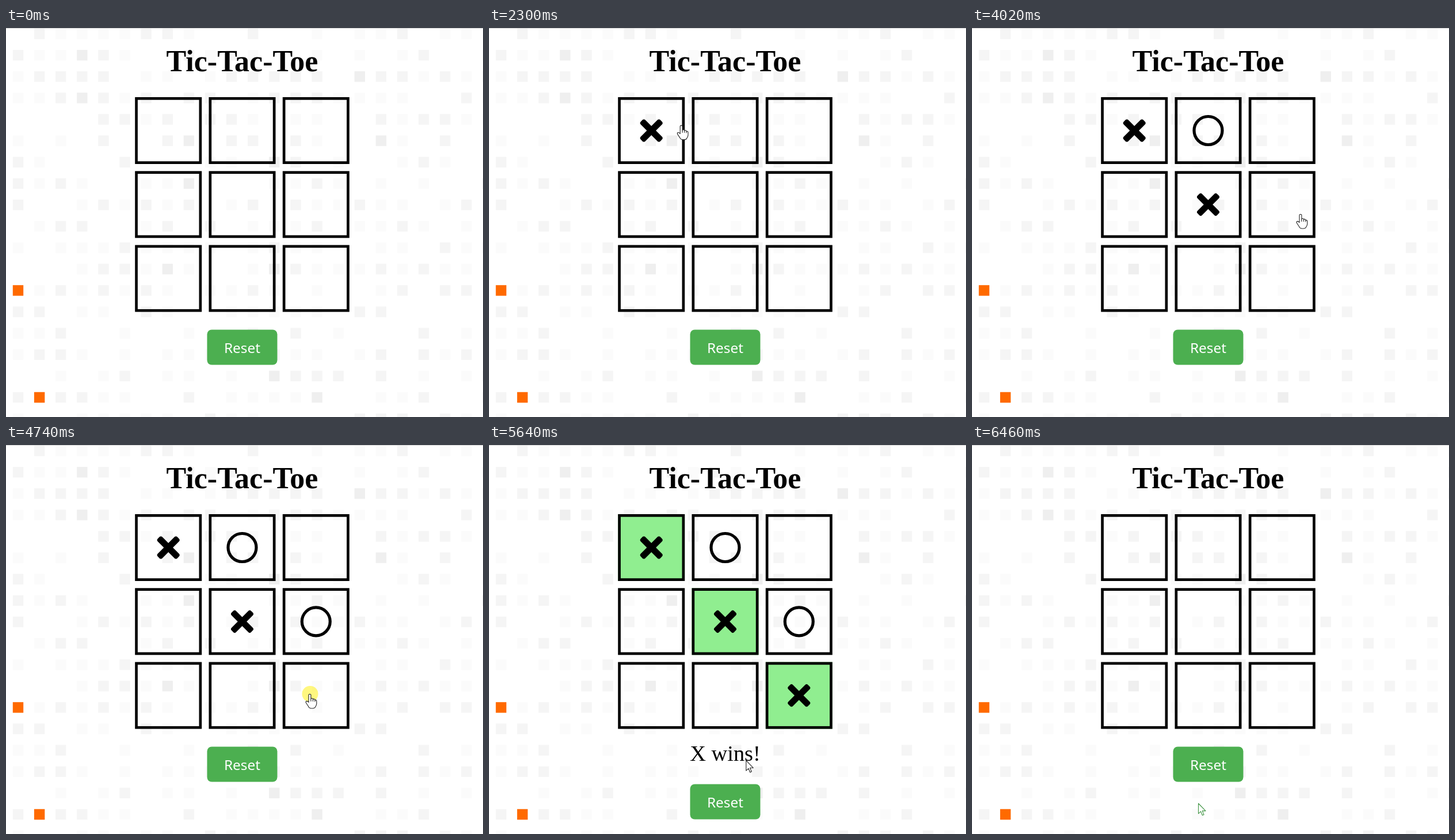
Recreate the animation shown at these times as an HTML page with a canvas. Size 829 px wide and 675 px high, loop 6660 ms.

```html
<!DOCTYPE html>
<html lang="en">
<head>
<meta charset="utf-8">
<title>Tic-Tac-Toe</title>
<style>
html, body { margin: 0; width: 100%; height: 100%; overflow: hidden; background: #fff; }
canvas { display: block; }
</style>
</head>
<body>
<canvas id="stage" width="829" height="675"></canvas>
<script>
const ctx = document.getElementById('stage').getContext('2d');
const LOOP = 6660, STEP = 100, CENTER = 410.5;
const SIZE = 116, PITCH = 128.3, LINE = 4.7, TOP = 120;
const LEFT = CENTER - PITCH - SIZE / 2;
const SERIF = '"Palatino Linotype", Palatino, "Liberation Serif", serif';
const SANS = '"Noto Sans", "Open Sans", sans-serif';

// The pointer leaves, arrives and clicks; the result shows at `done`.
const entry = { x: 727, y: 665 };
const turns = [
  { leave: 790, arrive: 1390, click: 1900, done: 2200, x: 271, y: 153, cell: 0 },
  { leave: 2200, arrive: 2600, click: 2700, done: 2900, x: 452, y: 198, cell: 1 },
  { leave: 3100, arrive: 3620, click: 3820, done: 4020, x: 379, y: 312, cell: 4 },
  { leave: 3920, arrive: 4020, click: 4120, done: 4320, x: 571.5, y: 323, cell: 5 },
  { leave: 4520, arrive: 4620, click: 4720, done: 4940, x: 528.5, y: 432, cell: 8 }
];
const reset = { leave: 5340, arrive: 5960, click: 6160, done: 6360, x: 393, y: 621.5 };
const stops = [...turns, reset];
const winAt = turns[turns.length - 1].done;

const cells = Array.from({ length: 9 }, (_, i) => ({
  col: i % 3,
  row: Math.floor(i / 3),
  x: LEFT + (i % 3) * PITCH,
  y: TOP + Math.floor(i / 3) * PITCH
}));

const hand = new Path2D('M-2.5 14.5V2Q-2.5 .3 -.6 .3Q1.4 .3 1.4 2V9Q1.6 7.4 3.2 7.5Q5 7.7 5 9.4' +
  'Q5.6 8.4 7 8.7Q8.4 9 8.4 10.6Q11.3 9.8 11.3 12.6V17Q11 20 9 22.6Q8 25 4.5 25H2' +
  'Q-1.5 25 -3 21.5L-7 15.5Q-8 13.4 -6.4 12.5Q-4.8 12 -2.5 14.5Z');
const arrow = new Path2D('M.5 .5V18.2L4.6 14.4L7.4 21L10 19.9L7.3 13.4H13Z');

function noise(n) {
  const s = Math.sin(n * 12.9898) * 43758.5453;
  return s - Math.floor(s);
}

function tile(col, row, color) {
  ctx.fillStyle = color;
  ctx.fillRect(11.8 + col * 37.11, 0.9 + row * 37.11, 18.4, 18.4);
}

function background() {
  ctx.fillStyle = '#fff';
  ctx.fillRect(0, 0, 829, 675);
  for (let row = 0; row < 19; row++) {
    for (let col = 0; col < 23; col++) {
      const v = noise(row * 23 + col + 1);
      if (v < 0.03) tile(col, row, '#efefef');
      else if (v < 0.33) tile(col, row, '#f5f5f5');
      else if (v < 0.68) tile(col, row, '#fbfbfb');
    }
  }
  tile(0, 12, '#ff6a00');
  tile(1, 17, '#ff6a00');
  ctx.fillStyle = '#d2d2d2';
  ctx.fillRect(0, 0, 829, 1);
}

function text(str, y, font, color) {
  ctx.font = font;
  ctx.textAlign = 'center';
  ctx.fillStyle = color;
  ctx.fillText(str, CENTER, y);
}

function roundBox(x, y, w, h, r) {
  ctx.beginPath();
  ctx.roundRect(x, y, w, h, r);
  ctx.fill();
}

function disc(x, y, r) {
  ctx.beginPath();
  ctx.arc(x, y, r, 0, Math.PI * 2);
}

function board(won) {
  ctx.strokeStyle = '#000';
  ctx.lineWidth = LINE;
  for (const { x, y, row, col } of cells) {
    if (won && row === col) {
      ctx.fillStyle = '#90ee90';
      ctx.fillRect(x, y, SIZE, SIZE);
    }
    ctx.strokeRect(x + LINE / 2, y + LINE / 2, SIZE - LINE, SIZE - LINE);
  }
}

function mark({ x, y }, cross) {
  ctx.save();
  ctx.translate(x + SIZE / 2, y + SIZE / 2);
  ctx.fillStyle = ctx.strokeStyle = '#000';
  if (cross) {
    ctx.rotate(Math.PI / 4);
    roundBox(-24, -5.5, 48, 11, 3.5);
    roundBox(-5.5, -24, 11, 48, 3.5);
  } else {
    ctx.lineWidth = 5.2;
    disc(0, 0, 24.5);
    ctx.stroke();
  }
  ctx.restore();
}

// Eased position, advancing once per step.
function pointer(t) {
  const i = stops.findLastIndex(s => t >= s.leave);
  if (i < 0) return null;
  const to = stops[i], from = stops[i - 1] || entry;
  const count = Math.round((to.arrive - to.leave) / STEP) + 1;
  const p = Math.min(1, (Math.floor((t - to.leave) / STEP) + 1) / count);
  const e = p * p * (3 - 2 * p);
  return { x: from.x + (to.x - from.x) * e, y: from.y + (to.y - from.y) * e };
}

const inside = (p, x, y, w, h) => p.x >= x && p.x <= x + w && p.y >= y && p.y <= y + h;

function cursor({ x, y }, shape, color) {
  ctx.save();
  ctx.translate(x, y);
  ctx.fillStyle = '#fff';
  ctx.strokeStyle = color;
  ctx.lineWidth = 1.1;
  ctx.lineJoin = 'round';
  ctx.fill(shape);
  ctx.stroke(shape);
  if (shape === hand) ctx.stroke(new Path2D('M1.4 9V13M5 9.4V13M8.4 10.6V13.5'));
  ctx.restore();
}

function draw(t) {
  const over = t >= reset.done;
  const won = t >= winAt && !over;
  const buttonY = won ? 588.5 : 523.5;
  const pos = pointer(t);
  const hover = pos && inside(pos, 349.5, buttonY, 122, 61);

  background();
  text('Tic-Tac-Toe', 75, 'bold 52px ' + SERIF, '#000');
  board(won);
  turns.forEach((turn, i) => {
    if (t >= turn.done && !over) mark(cells[turn.cell], i % 2 === 0);
  });
  if (won) text('X wins!', 547.5, '38.4px ' + SERIF, '#000');

  ctx.fillStyle = hover ? '#45a049' : '#4caf50';
  roundBox(349.5, buttonY, 122, 61, 8);
  text('Reset', buttonY + 40.5, '24.4px ' + SANS, '#fff');

  if (!pos) return;
  if (stops.some(s => t >= s.click && t < s.click + STEP)) {
    ctx.fillStyle = 'rgba(255, 240, 0, 0.5)';
    disc(pos.x, pos.y, 14);
    ctx.fill();
  }
  const active = hover || cells.some(c => inside(pos, c.x, c.y, SIZE, SIZE));
  cursor(pos, active ? hand : arrow, over ? '#3f9443' : '#222');
}

const start = performance.now();
function tick() {
  draw((performance.now() - start) % LOOP);
  requestAnimationFrame(tick);
}
tick();
</script>
</body>
</html>
```
